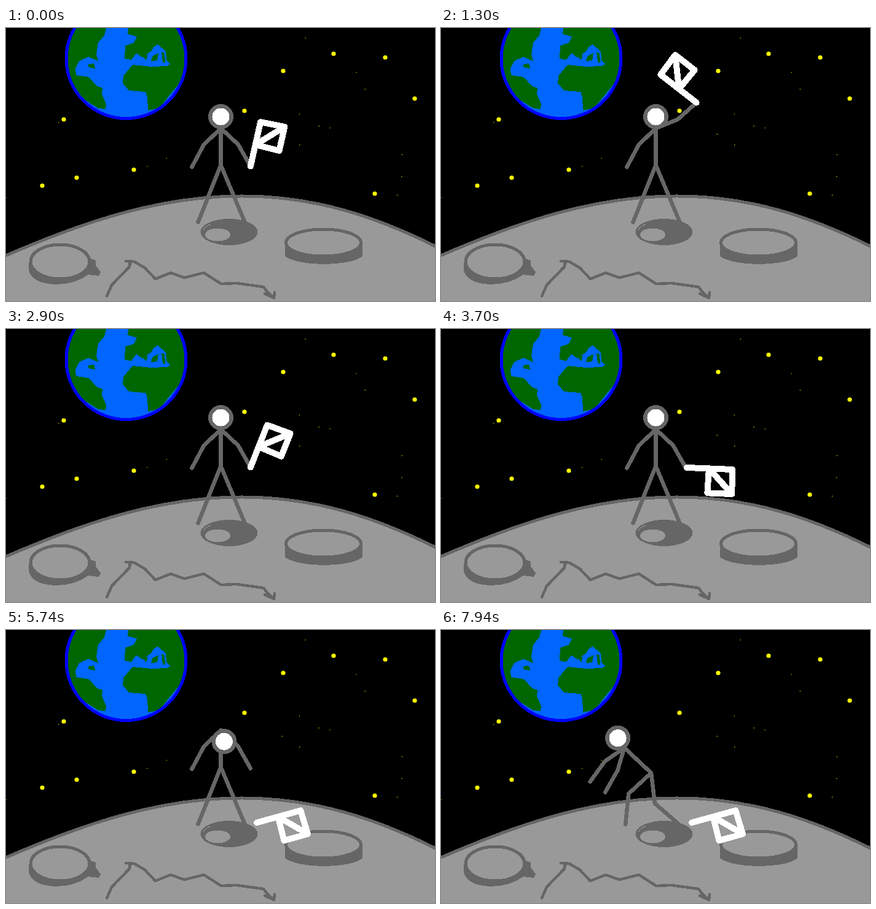
Animation, 698 px wide and 445 px high, one loop 8 s. Source, as an HTML page:

```html
<!DOCTYPE html>
<html lang="en">
<head>
<meta charset="utf-8">
<title>Flag on the moon</title>
<style>
html, body { margin: 0; width: 100%; height: 100%; overflow: hidden; background: #000; }
svg { display: block; width: 100%; height: 100%; }
.line { fill: none; stroke: #666; stroke-width: 6.5; stroke-linecap: round; stroke-linejoin: round; }
.crack { stroke-width: 4.5; }
.flag { fill: none; stroke: #fff; stroke-width: 10; stroke-linecap: round; stroke-linejoin: round; }
.rock { fill: #999; stroke: #666; stroke-width: 5; }
.dark { fill: #666; }
.land { fill: #060; }
.sea { fill: #06f; }
</style>
</head>
<body>
<svg viewBox="0 0 698 445" shape-rendering="crispEdges">
  <clipPath id="globe"><circle cx="195.5" cy="50" r="97.5"/></clipPath>
  <rect width="698" height="445"/>
  <g id="stars" fill="#ff0" shape-rendering="geometricPrecision"></g>

  <g id="earth">
    <g clip-path="url(#globe)">
      <rect class="sea" x="95" width="201" height="150"/>
      <!-- west -->
      <path class="land" d="M90 0H163L160 12 150 24 147 43 150 54 134 47 119 54 113 66 114 77 135 80 148 95 157 98 156 108 163 124 162 132 150 131 125 115 104 88 90 70Z"/>
      <path class="land" d="M134 59L143 58 145 66 134 64Z"/>
      <!-- east -->
      <path class="land" d="M199 0H300V70L279 94 249 131 231 134 230 112 227 104 200 102 190 90 191 78 206 60 236 63 262 62 215 47 203 52 193 50 194 29 208 24 213 14 198 10Z"/>
      <path class="sea" d="M203 53L212 41 222 48 236 38 241 30 247 27 260 38 261 52 267 59 262 62 206 60Z"/>
      <path class="land" d="M220 42L231 44 228 53ZM238 46L248 41 246 53 236 54ZM253 39L258 41 259 57 255 56Z"/>
    </g>
    <circle cx="195.5" cy="50" r="97.5" fill="none" stroke="#00f" stroke-width="5"/>
  </g>

  <g id="moon">
    <path class="rock" d="M-5 373C130 314 253 273.500 385 274C500 274 600 306 703 358V455H-5Z"/>
    <path class="dark" d="M41 374C31 390 37 408 59 415C85 422 115 416 134 402L151 404 154 398 146 387 146 379 137 376Z"/>
    <ellipse class="rock" cx="88" cy="381" rx="48" ry="28"/>
    <path class="dark" d="M454 348V372C475 389 560 389 580 372V348Z"/>
    <ellipse class="rock" cx="516.500" cy="350" rx="61" ry="22"/>
    <ellipse class="dark" cx="363" cy="332.500" rx="46.500" ry="21.500"/>
    <ellipse cx="344.500" cy="337" rx="20.500" ry="10.500" fill="#999"/>
    <path d="M321 329Q324 323 333 320" fill="none" stroke="#999"/>
    <path class="line crack" d="M164 437L172 419 201 389 202 380H195M202 380L209 381 226 391 243 409 268 399 290 407 322 399 350 417 375 416 419 422 425 430 436 440M421 433L436 440 437 431"/>
  </g>

  <path id="body" class="line"/>
  <g id="head">
    <circle class="dark" r="20.5"/>
    <circle r="14" fill="#fff"/>
  </g>
  <path id="flag" class="flag" d="M0 0H74L75 40H35L36 0L75 40"/>
</svg>
<script>
const $ = id => document.getElementById(id);
const LOOP = 8000, DROP = 3700;

// Ten bright stars, and a seeded scatter of faint ones behind everything.
const bright = [[94,149],[59,257],[115,244],[208,231],[388,135],[451,70],[533,42],[617,48],[665,115],[600,270]];
let seed = 7;
const random = () => (seed = seed * 16807 % 2147483647) / 2147483647;
const faint = Array.from({ length: 18 }, () => [random() * 698, random() * 300]);
const dots = (list, r) => list.map(([x, y]) => `<circle cx="${x}" cy="${y}" r="${r}"/>`).join('');
$('stars').innerHTML = dots(bright, 3.6) + dots(faint, 0.7);

// Angles are in degrees, clockwise from the right.
const stand = {
  head: -90, torso: -90, hipX: 349.5, hipY: 223.5,
  upperL: 136, foreL: 118, upperR: 43, foreR: 60.5,
  thighL: 111.7, shinL: 111.7, thighR: 67.2, shinR: 67.2
};
const raised = { ...stand, upperR: -27, foreR: -50 };
const lowering = { ...stand, upperR: 20, foreR: 5 };
const sad = { ...stand, head: 90 };
const turned = { ...stand, head: -124, upperL: 145, foreL: 126, upperR: 106.5, foreR: 119.5 };
const stooped = {
  ...turned, torso: -136.8, hipX: 342, hipY: 233,
  thighL: 137.4, shinL: 95.7, thighR: 83.2, shinR: 41
};
const figure = [
  [0, stand], [1400, raised], [2100, lowering], [2800, stand], [4800, stand],
  [5500, sad], [5640, sad], [6740, stand], [7440, turned], [7940, stooped]
];

// The flag turns in the hand, then falls and settles.
const held = angle => ({ angle, x: 400, y: 226 });
const flag = [
  [0, held(-77.3)], [1400, held(-147)], [2800, held(-77.3)], [DROP, held(2.3)],
  [4500, { angle: -1, x: 407, y: 296 }], [4900, { angle: -15.5, x: 408, y: 314 }]
];

function poseAt(keys, t) {
  const next = keys.findIndex(([time]) => time > t);
  if (next < 0) return keys[keys.length - 1][1];
  const [t0, a] = keys[next - 1], [t1, b] = keys[next];
  const k = (t - t0) / (t1 - t0), pose = {};
  for (const name in a) pose[name] = a[name] + (b[name] - a[name]) * k;
  return pose;
}

function move([x, y], angle, length) {
  const r = angle * Math.PI / 180;
  return [x + length * Math.cos(r), y + length * Math.sin(r)];
}

function limb(start, a, b, l1, l2) {
  const joint = move(start, a, l1);
  return [start, joint, move(joint, b, l2)];
}

const line = points => 'M' + points.map(p => p.join(' ')).join('L');

// Ten poses a second, with one longer pause.
function step(t) {
  if (t < 5500) return Math.floor(t / 100) * 100;
  if (t < 5740) return 5500;
  return Math.floor((t - 40) / 100) * 100 + 40;
}

function draw(t) {
  const p = poseAt(figure, t), f = poseAt(flag, t);
  const hip = [p.hipX, p.hipY];
  const neck = move(hip, p.torso, 60);
  const arm = (upper, fore) => limb(neck, upper, fore, 38.5, 41);
  const leg = (thigh, shin) => limb(hip, thigh, shin, 50, 50);
  const armR = arm(p.upperR, p.foreR);
  const parts = [[hip, neck], armR, arm(p.upperL, p.foreL), leg(p.thighL, p.shinL), leg(p.thighR, p.shinR)];
  $('body').setAttribute('d', parts.map(line).join(''));
  $('head').setAttribute('transform', `translate(${move(neck, p.head, 19)})`);

  const grip = t < DROP ? armR[2] : [f.x, f.y];
  $('flag').setAttribute('transform', `translate(${grip}) rotate(${f.angle})`);
}

const start = performance.now();
function tick() {
  draw(step((performance.now() - start) % LOOP));
  requestAnimationFrame(tick);
}
tick();
</script>
</body>
</html>
```
